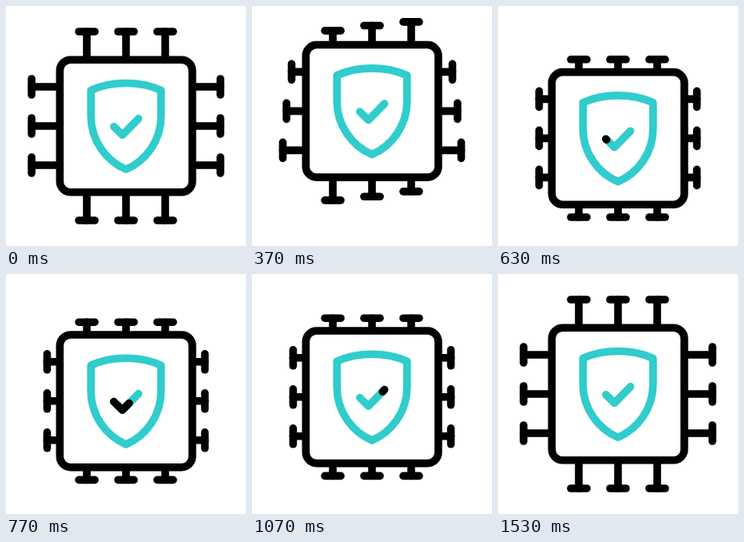
An HTML page with a canvas for the animation above (1670 ms loop, 300x300 px).

```html
<!DOCTYPE html>
<html lang="en">
<head>
<meta charset="utf-8">
<title>Secure chip</title>
<style>
  html, body { margin: 0; width: 100%; height: 100%; overflow: hidden; background: #fff; }
  canvas { display: block; width: 300px; height: 300px; }
</style>
</head>
<body>
<canvas id="stage" width="300" height="300"></canvas>
<script>
const ctx = document.getElementById('stage').getContext('2d');
const LOOP = 1670;
const BLACK = '#000';
const TEAL = '#31cccc';
const STROKE = 9.6;
const PIN_REACH = 118;
const PIN_TRAVEL = 19.4;
const PIN_GAP = 49;

// Vertical bounce as [time, offset] pairs.
const BOUNCE = [[0, 0], [350, -19], [675, 17], [933, -10], [1095, 4.6], [1480, 0]];
const PIN_IN = [158, 225, 266];
const PIN_OUT = [1200, 1265, 1328];

const CHECK = [[134.8, 150.8], [145.5, 161.3], [165.6, 140.8]];

const shield = new Path2D(
  'M106.2 105.3C119.5 99.3 134 96.5 150 96.5S180.5 99.3 193.8 105.3' +
  'V138C193.8 168 175 193.5 150 204.2C125 193.5 106.2 168 106.2 138Z');
const body = new Path2D();
body.roundRect(67.3, 67.2, 165.6, 165.6, 13.5);

// Eased progress from 0 to 1.
function ease(t, start, duration) {
  const p = Math.min(1, Math.max(0, (t - start) / duration));
  return (1 - Math.cos(Math.PI * p)) / 2;
}

function bounceAt(t) {
  return BOUNCE.slice(1).reduce((y, [time, target], i) => {
    const [from, value] = BOUNCE[i];
    return y + (target - value) * ease(t, from, time - from);
  }, 0);
}

function strokePoints(points) {
  ctx.beginPath();
  points.forEach(([x, y]) => ctx.lineTo(x, y));
  ctx.stroke();
}

function drawPin(side, slot, reach) {
  const across = (slot - 1) * PIN_GAP;
  ctx.save();
  ctx.translate(150, 150);
  ctx.rotate(side * Math.PI / 2);
  strokePoints([[across, -84], [across, -reach]]);
  strokePoints([[across - 10, -reach], [across + 10, -reach]]);
  ctx.restore();
}

function drawPins(t) {
  for (let order = 0; order < 3; order++) {
    const retract = ease(t, PIN_IN[order], 267) - ease(t, PIN_OUT[order], 200);
    const reach = PIN_REACH - PIN_TRAVEL * retract;
    // Top runs left to right, both sides downwards, bottom right to left.
    for (let side = 0; side < 3; side++) drawPin(side, order, reach);
    drawPin(3, 2 - order, reach);
  }
}

// Part of the check mark between two fractions of its length.
function strokeCheck(from, to) {
  const [a, b, c] = CHECK;
  const first = Math.hypot(b[0] - a[0], b[1] - a[1]);
  const bend = first / (first + Math.hypot(c[0] - b[0], c[1] - b[1]));
  const mix = (p, q, k) => [p[0] + (q[0] - p[0]) * k, p[1] + (q[1] - p[1]) * k];
  const at = f => f < bend ? mix(a, b, f / bend) : mix(b, c, (f - bend) / (1 - bend));
  const points = [at(from)];
  if (from < bend && to > bend) points.push(b);
  points.push(at(to));
  strokePoints(points);
}

function draw(t) {
  ctx.fillStyle = '#fff';
  ctx.fillRect(0, 0, 300, 300);
  ctx.save();
  ctx.translate(0, bounceAt(t));
  ctx.lineWidth = STROKE;
  ctx.lineCap = ctx.lineJoin = 'round';

  ctx.strokeStyle = BLACK;
  drawPins(t);
  ctx.stroke(body);

  ctx.strokeStyle = TEAL;
  ctx.stroke(shield);
  strokeCheck(0, 1);

  const head = ease(t, 598, 300);
  const tail = ease(t, 825, 300);
  if (head - tail > 0.001) {
    ctx.strokeStyle = BLACK;
    strokeCheck(tail, head);
  }
  ctx.restore();
}

const begin = performance.now();
function tick() {
  draw((performance.now() - begin) % LOOP);
  requestAnimationFrame(tick);
}
tick();
</script>
</body>
</html>
```
